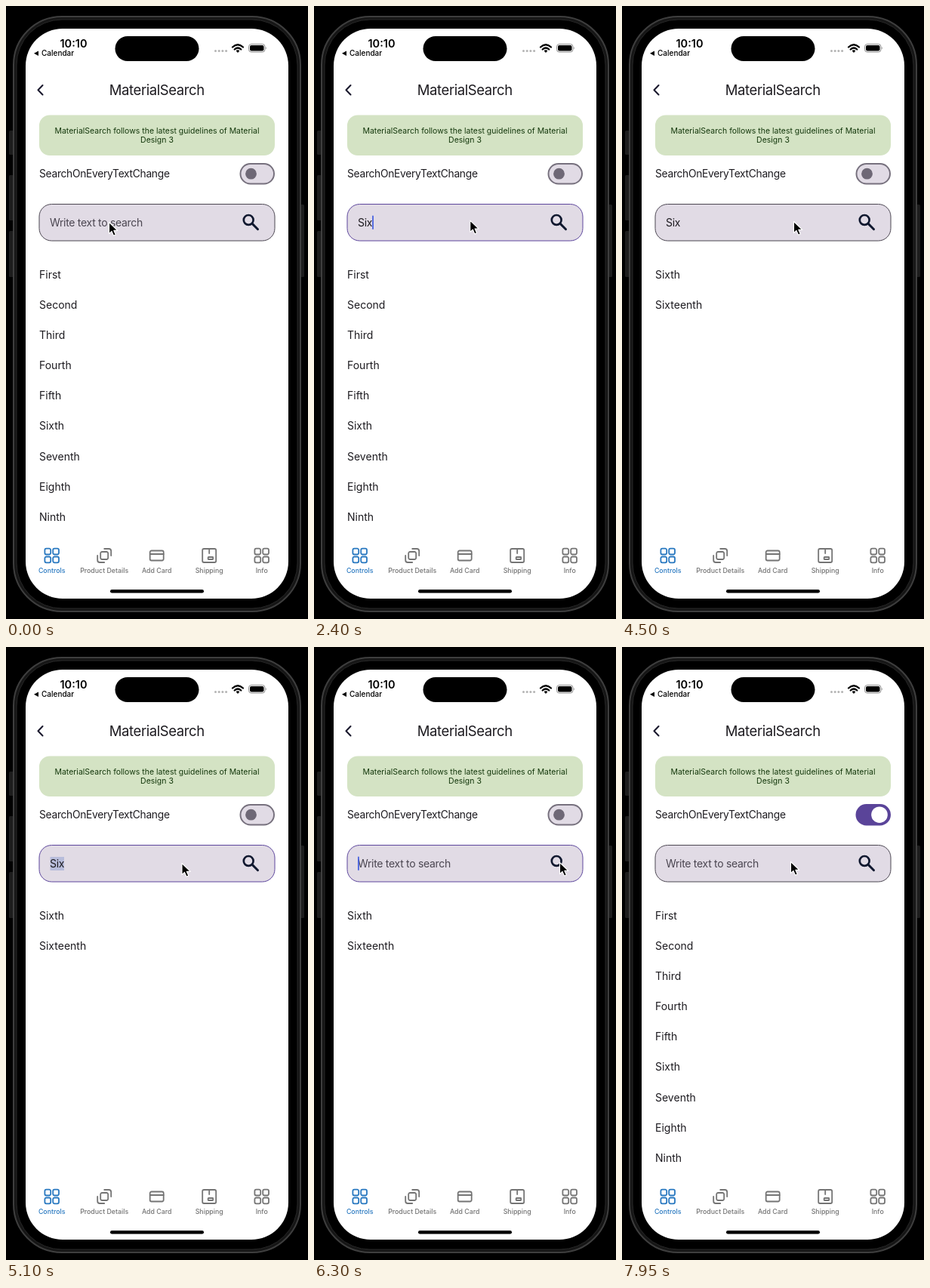
Recreate the animation shown at these times as an HTML page. Size 400x812 px, loop 8000 ms.

```html
<!DOCTYPE html>
<html lang="en">
<head>
<meta charset="utf-8">
<title>Search demo</title>
<style>
  html, body { margin: 0; width: 100%; height: 100%; overflow: hidden; background: #000; }
  svg { display: block; width: 100%; height: 100%; font-family: Inter, Roboto, sans-serif; font-size: 14px; fill: #1d1b20; }
  .line { fill: none; stroke-linecap: round; stroke-linejoin: round; }
  .mid { text-anchor: middle; }
  .tight { letter-spacing: -.3px; }
  .tab text { font-size: 8.8px; font-weight: 500; text-anchor: middle; }
</style>
</head>
<body>
<svg viewBox="0 0 400 812">
  <defs>
    <filter id="shadow" x="-20%" y="-60%" width="140%" height="260%">
      <feDropShadow dx="0" dy="3" stdDeviation="6" flood-color="#000" flood-opacity=".24"/>
    </filter>
  </defs>

  <!-- phone body -->
  <rect width="400" height="812" fill="#000"/>
  <g fill="#1d1d1d">
    <rect x="4" y="165" width="6" height="32" rx="1.5"/>
    <rect x="4" y="224" width="6" height="60" rx="1.5"/>
    <rect x="4" y="298" width="6" height="61" rx="1.5"/>
    <rect x="390" y="263" width="5" height="96" rx="1.5"/>
  </g>
  <rect x="10" y="14" width="380" height="788" rx="64" fill="#161616" stroke="#3e3e3e" stroke-width="2"/>
  <rect x="14" y="18" width="372" height="780" rx="60" fill="#000" stroke="#282828"/>
  <rect x="26" y="30" width="348" height="755" rx="49" fill="#fff"/>
  <rect x="144.500" y="40" width="111" height="33" rx="16.500" fill="#000"/>
  <rect x="138" y="773" width="124" height="4.500" rx="2.200" fill="#000"/>

  <!-- status bar -->
  <g fill="#000">
    <text x="89.500" y="54.500" class="mid" font-size="14.500" font-weight="600">10:10</text>
    <path d="M43 59.500v6.500l-6-3.200z"/>
    <text x="47" y="66" font-size="10" font-weight="500">Calendar</text>
    <g id="dots" fill="#b4b4b4"></g>
    <g class="line" stroke="#000" stroke-width="2.300" stroke-linecap="butt">
      <path d="M300 54.500q7-6.500 14 0M302.700 57.500q4.300-4 8.600 0"/>
    </g>
    <path d="M304.600 59.300q2.400-2 4.800 0L307 62z"/>
    <rect x="321.500" y="50.500" width="21.500" height="10.500" rx="3.400" fill="none" stroke="#8d8d8d"/>
    <rect x="323" y="52" width="18.500" height="7.500" rx="2"/>
    <path d="M344.200 54q1.800 1.700 0 3.500z" fill="#8d8d8d"/>
  </g>

  <!-- header -->
  <path class="line" d="M48.500 105l-6 6.200 6 6.200" stroke="#1c1b2f" stroke-width="2.100"/>
  <text x="199.800" y="118" class="mid" font-size="18.500" letter-spacing="-.4">MaterialSearch</text>
  <rect x="44" y="144.500" width="312" height="53.500" rx="14" fill="#d4e3c4"/>
  <g class="mid" font-size="10.500" fill="#14380c">
    <text x="200" y="169">MaterialSearch follows the latest guidelines of Material</text>
    <text x="200" y="181">Design 3</text>
  </g>
  <text x="44" y="227" class="tight" font-size="13.800">SearchOnEveryTextChange</text>
  <rect id="track" x="310.500" y="209" width="44.500" height="26.500" rx="13.200" stroke-width="2"/>
  <circle id="thumb" cy="222.200"/>

  <!-- search field -->
  <rect id="field" x="44" y="262.500" width="312" height="48.500" rx="16.500" fill="#e1dbe5"/>
  <g class="line" stroke="#10182f" stroke-width="2.700">
    <circle cx="321.200" cy="283.400" r="6.400"/>
    <path d="M326.200 288.400l7.300 7.300" stroke-width="3"/>
  </g>
  <rect id="highlight" x="58.500" y="278" width="18.500" height="18" fill="#b8bddb"/>
  <text id="query" x="58" y="291.500" class="tight"></text>
  <rect id="caret" y="277.500" width="1.800" height="18.500" rx=".9" fill="#4863e0"/>

  <g id="list"></g>

  <!-- tab bar -->
  <g id="tabs"></g>

  <!-- edit menu -->
  <g id="menu">
    <g fill="#1c62d4">
      <path d="M58 272h1.800v24H58zM76.200 277H78v23h-1.800z"/>
      <circle cx="58.700" cy="272.200" r="7.200"/>
      <circle cx="77" cy="300" r="7.200"/>
    </g>
    <path d="M53 229H323q10 0 10 10v16q0 10-10 10H77q-3 0-5 3l-2 2q-2 2-4 0l-2-2q-2-3-5-3H53q-10 0-10-10V239q0-10 10-10z" fill="#f6f5f7" filter="url(#shadow)"/>
    <path d="M93.500 229.500v35M153.500 229.500v35M215.500 229.500v35M303.500 229.500v35" stroke="#dfdee1"/>
    <g id="actions" class="mid" font-size="13" letter-spacing="-.1" fill="#000"></g>
    <path class="line" d="M317 242.500l4 4.500-4 4.500" stroke="#000" stroke-width="1.700"/>
  </g>

  <path id="cursor" d="M0 0v15.200l3.500-3.300 2.500 5.800 2.800-1.200-2.500-5.600h5z" fill="#000" stroke="#fff" stroke-width="1.100" stroke-linejoin="round"/>
</svg>

<script>
const LOOP = 8000;
const $ = id => document.getElementById(id);
const box = (x, y, w, h, r) => `<rect x="${x}" y="${y}" width="${w}" height="${h}" rx="${r}"/>`;

const ORDINALS = ['First', 'Second', 'Third', 'Fourth', 'Fifth', 'Sixth', 'Seventh', 'Eighth', 'Ninth'];
const MATCHES = ['Sixth', 'Sixteenth'];

// Icons are drawn around their own centre.
const grid = [-9.3, 1.5].map(x => [-9.3, 1.5].map(y => box(x, y, 7.8, 7.8, 2)).join('')).join('');
const ICONS = {
  grid,
  stack: box(-5, -5, 10, 10, 2) + '<path d="M0-9h6q3 0 3 3v6M0 9h-6q-3 0-3-3v-6"/>',
  card: box(-9, -6.5, 18, 13, 2) + '<path d="M-9-2H9"/>',
  parcel: box(-9, -9, 18, 18, 2) + '<path d="M0-9v6"/>' + box(-1.5, 2, 6.5, 3, .5)
};
const TABS = [['Controls', 'grid'], ['Product Details', 'stack'], ['Add Card', 'card'], ['Shipping', 'parcel'], ['Info', 'grid']];

$('tabs').innerHTML = TABS.map(([label, icon], i) => {
  const color = i ? '#747474' : '#2878c0';
  return `<g class="tab" transform="translate(${60.7 + i * 69.5} 728)">
    <g class="line" stroke="${color}" stroke-width="1.8">${ICONS[icon]}</g>
    <text y="23" fill="${color}">${label}</text></g>`;
}).join('');

$('dots').innerHTML = [0, 1, 2, 3].map(i => `<circle cx="${277.5 + i * 4.7}" cy="59.500" r="1.500"/>`).join('');
$('actions').innerHTML = [['Cut', 67.7], ['Copy', 123], ['Paste', 184.5], ['Replace…', 259.5]]
  .map(([label, x]) => `<text x="${x}" y="251.500">${label}</text>`).join('');

// Stepped values: [start time, value]
const QUERY = [[0, ''], [1400, 'S'], [1600, 'Si'], [1800, 'Six'], [5900, '']];
const FOCUS = [[0, false], [650, true], [3050, false], [4950, true], [6400, false]];
const ROWS = [[0, ORDINALS], [3100, MATCHES], [6450, ORDINALS]];

// Cursor tip: [time, x, y]
const PATH = [
  [0, 136.5, 286.5], [350, 147, 285], [2150, 147, 285], [2800, 327, 282.5], [3600, 327, 282.5],
  [4300, 227.5, 285.5], [4600, 227.5, 285.5], [4900, 233, 286.5], [5850, 233, 286.5],
  [6200, 325.5, 285.5], [6550, 325.5, 285.5], [6950, 332, 222], [7300, 332, 222], [7850, 223.5, 284.5]
];

const clamp = v => Math.max(0, Math.min(1, v));
const smooth = v => (v = clamp(v), v * v * (3 - 2 * v));
const mix = (a, b, k) => a + (b - a) * k;
const stepAt = (steps, t) => steps.findLast(s => s[0] <= t)[1];
const set = (id, attrs) => { for (const k in attrs) $(id).setAttribute(k, attrs[k]); };

function pointAt(t) {
  const i = PATH.findLastIndex(p => p[0] <= t);
  const a = PATH[i], b = PATH[i + 1] || a;
  const k = smooth((t - a[0]) / (b[0] - a[0] || 1));
  return [mix(a[1], b[1], k), mix(a[2], b[2], k)];
}

let shownRows;
function showRows(rows) {
  if (rows === shownRows) return;
  shownRows = rows;
  $('list').innerHTML = rows.map((row, i) => `<text x="44" y="${360.7 + i * 40.15}">${row}</text>`).join('');
}

function render(t) {
  const query = stepAt(QUERY, t), focused = stepAt(FOCUS, t);
  const selected = t >= 5100 && t < 5900;
  const on = smooth((t - 7150) / 200);

  showRows(stepAt(ROWS, t));
  $('query').textContent = query || 'Write text to search';
  set('query', { fill: query ? '#1d1b20' : '#4b4651' });
  set('field', { stroke: focused ? '#5c459c' : '#4b4651' });
  set('caret', {
    x: 58 + (query ? $('query').getComputedTextLength() : 0),
    opacity: focused && !selected ? 1 : 0
  });
  set('highlight', { opacity: selected ? 1 : 0 });
  set('menu', { opacity: selected ? clamp((t - 5150) / 200) : 0 });
  set('track', { fill: on > .5 ? '#5a4499' : '#e1dbe5', stroke: on > .5 ? '#5a4499' : '#77717e' });
  set('thumb', { cx: mix(324.5, 341, on), r: mix(7.4, 10.8, on), fill: on > .5 ? '#fff' : '#6e6876' });
  set('cursor', { transform: `translate(${pointAt(t)})` });
}

const start = performance.now();
function tick(now) {
  render(Math.max(0, now - start) % LOOP);
  requestAnimationFrame(tick);
}
render(0);
requestAnimationFrame(tick);
</script>
</body>
</html>
```
